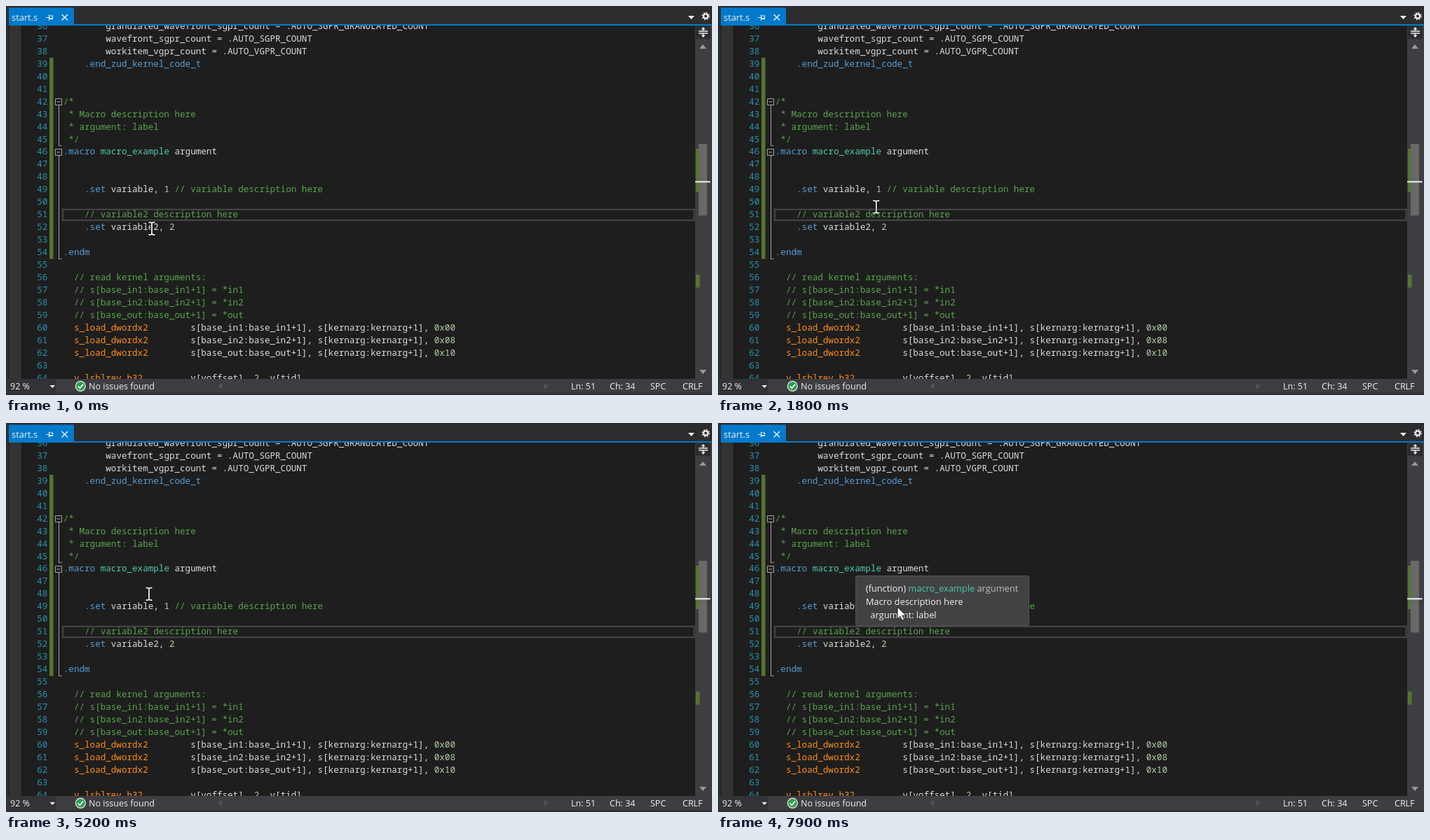
These frames come from a looping animation (1007 px wide and 556 px high, 8 s). An HTML page:

```html
<!DOCTYPE html>
<html lang="en">
<head>
<meta charset="utf-8">
<title>Editor hover hints</title>
<style>
html, body { margin: 0; width: 100%; height: 100%; overflow: hidden; background: #2d2d30; }
svg { display: block; }
text { white-space: pre; }
.code { font: 12.6px "Noto Sans Mono", "DejaVu Sans Mono", monospace; }
.ui { font: 12.85px "Open Sans", "Noto Sans", sans-serif; fill: #f1f1f1; }
.status { font-size: 12.5px; }
</style>
</head>
<body>
<svg id="stage" width="1007" height="556" viewBox="0 0 1007 556">
  <defs><clipPath id="view"><rect x="0" y="28" width="983" height="505"/></clipPath></defs>

  <!-- tab strip -->
  <rect width="1007" height="556" fill="#2d2d30"/>
  <path d="M4 2.5H97V26H1007V28H4Z" fill="#007acc"/>
  <text class="ui" x="8" y="20.5">start.s</text>
  <g fill="none" stroke="#d8eaf6" stroke-width="1.2">
    <path d="M57 16.5H61M61.5 12.5V20.5M61.5 14H66.5V18.5H61.5M61.5 17.6H66.5"/>
    <path d="M79.5 12L88 20.5M88 12L79.5 20.5" stroke-width="1.7"/>
  </g>
  <path d="M973 14H982L977.5 19Z" fill="#f1f1f1"/>
  <circle cx="998" cy="14.5" r="3" fill="none" stroke="#f1f1f1" stroke-width="2"/>
  <circle cx="998" cy="14.5" r="4.7" fill="none" stroke="#f1f1f1" stroke-width="2" stroke-dasharray="1.85 1.84"/>

  <!-- editor -->
  <rect x="4" y="28" width="979" height="505" fill="#1e1e1e"/>
  <rect x="5" y="28" width="16.5" height="505" fill="#333333"/>
  <rect x="62" y="74" width="5.5" height="287.5" fill="#577430"/>
  <rect x="81" y="290.8" width="900.5" height="15.4" fill="none" stroke="#464646" stroke-width="2"/>
  <g fill="none" stroke="#a5a5a5">
    <path d="M75.5 142V199.5H79.5M75.5 214V361.5H79.5"/>
    <path id="fold" d="M71 132.5H79.5V141.5H70.5V132.5ZM72.5 137H77.5"/>
    <use href="#fold" y="72"/>
  </g>
  <g id="code" class="code" clip-path="url(#view)"></g>

  <!-- vertical scroll bar -->
  <rect x="983" y="28" width="24" height="505" fill="#3e3e42"/>
  <rect x="984" y="28" width="21" height="19" fill="#2d2d30"/>
  <path d="M988 36H1001M988 39H1001M994.5 31V36M994.5 39V44" stroke="#f1f1f1" stroke-width="1.3"/>
  <path d="M991.5 33.5L994.5 30L997.5 33.5ZM991.5 41.5L994.5 45L997.5 41.5Z" fill="#f1f1f1"/>
  <path d="M989 61L994 55L999 61ZM989 520L994 526L999 520Z" fill="#999999"/>
  <rect x="988" y="197" width="12" height="102.5" fill="#686868"/>
  <path d="M984 204H988.5V266H984ZM984 384H989.5V402.5H984Z" fill="#577430"/>
  <rect x="983" y="250.3" width="21.5" height="2" fill="#f1f1f1"/>

  <!-- bottom bar -->
  <rect y="533" width="1007" height="20.5" fill="#3e3e42"/>
  <rect y="533" width="72" height="20.5" fill="#333337"/>
  <path d="M62.5 542H70L66.2 546Z" fill="#f1f1f1"/>
  <path d="M308 539V548L303 543.5ZM768 539V548L773 543.5Z" fill="#555558"/>
  <circle cx="106.3" cy="543.3" r="7" fill="#2f9e4f" stroke="#f1f1f1" stroke-width="1.2"/>
  <path d="M102.7 543.5L105.3 546.2L110 540.6" fill="none" stroke="#fff" stroke-width="1.7"/>
  <g id="status"></g>

  <g id="tips"></g>
  <g id="beam" fill="none">
    <path d="M-4.5 -9H-1.5L0 -8L1.5 -9H4.5M0 -8V7.5M-4.5 8.5H-1.5L0 7.5L1.5 8.5H4.5" stroke="#000" stroke-width="3"/>
    <path d="M-4.5 -9H-1.5L0 -8L1.5 -9H4.5M0 -8V7.5M-4.5 8.5H-1.5L0 7.5L1.5 8.5H4.5" stroke="#fff" stroke-width="1.7"/>
  </g>
  <path id="arrow" d="M0 0V17L4 13.3L6.7 19.3L9.5 18.1L6.9 12.2H12.2Z" fill="#fff" stroke="#111" stroke-width=".9"/>
</svg>
<script>
const $ = id => document.getElementById(id);
const CHAR = 7.56, LEFT = 81.8, ROW = 17.95;
const COLORS = { t: '#dcdcdc', c: '#57a64a', k: '#569cd6', m: '#4ec9b0', o: '#ff8c1a', n: '#b5cea8', l: '#2b91af', g: '#bdbdbd', w: '#f1f1f1' };

function make(parent, tag, attrs, text = '') {
  const el = document.createElementNS('http://www.w3.org/2000/svg', tag);
  for (const key in attrs) el.setAttribute(key, attrs[key]);
  el.textContent = text;
  parent.append(el);
  return el;
}

// line number: column, then pairs of colour key and text
const LOAD = (reg, off) => [2, 'o', 's_load_dwordx2        ', 't', `s[${reg}:${reg}+1], s[kernarg:kernarg+1], `, 'n', off];
const LINES = {
  36: [8, 't', 'granulated_wavefront_sgpr_count = .AUTO_SGPR_GRANULATED_COUNT'],
  37: [8, 't', 'wavefront_sgpr_count = .AUTO_SGPR_COUNT'],
  38: [8, 't', 'workitem_vgpr_count = .AUTO_VGPR_COUNT'],
  39: [4, 'k', '.end_zud_kernel_code_t'],
  42: [0, 'c', '/*'],
  43: [1, 'c', '* Macro description here'],
  44: [1, 'c', '* argument: label'],
  45: [1, 'c', '*/'],
  46: [0, 'k', '.macro ', 'm', 'macro_example ', 't', 'argument'],
  49: [4, 'k', '.set ', 't', 'variable, ', 'n', '1 ', 'c', '// variable description here'],
  51: [4, 'c', '// variable2 description here'],
  52: [4, 'k', '.set ', 't', 'variable2, ', 'n', '2'],
  54: [0, 'k', '.endm'],
  56: [2, 'c', '// read kernel arguments:'],
  57: [2, 'c', '// s[base_in1:base_in1+1] = *in1'],
  58: [2, 'c', '// s[base_in2:base_in2+1] = *in2'],
  59: [2, 'c', '// s[base_out:base_out+1] = *out'],
  60: LOAD('base_in1', '0x00'),
  61: LOAD('base_in2', '0x08'),
  62: LOAD('base_out', '0x10'),
  64: [2, 'o', 'v_lshlrev_b32         ', 't', 'v[voffset], ', 'n', '2', 't', ', v[tid]']
};

function runs(parent, x, y, parts) {
  const line = make(parent, 'text', { x, y });
  for (let i = 0; i < parts.length; i += 2) {
    make(line, 'tspan', { fill: COLORS[parts[i]] }, parts[i + 1]);
  }
}

for (let n = 36; n <= 64; n++) {
  const y = 302.2 + (n - 51) * ROW;
  runs($('code'), 44.2, y, ['l', String(n)]);
  if (LINES[n]) {
    const [col, ...parts] = LINES[n];
    runs($('code'), LEFT + col * CHAR, y, parts);
  }
}

for (const [x, text] of [[6, '92 %'], [118, 'No issues found'], [806, 'Ln: 51'], [861, 'Ch: 34'], [919, 'SPC'], [965, 'CRLF']]) {
  make($('status'), 'text', { class: 'ui status', x, y: 548.3 }, text);
}

const TIPS = [
  { from: 400, to: 1700, box: [193, 325.5, 198, 53],
    rows: [['w', '(local variable) variable2 = 2'], ['w', 'variable2 description here']] },
  { from: 2700, to: 5100, box: [197, 272.5, 190, 52.5],
    rows: [['w', '(local variable) variable = 1'], ['w', 'variable description here']] },
  { from: 6000, to: 8000, box: [196, 218, 248, 72],
    rows: [['w', '(function) ', 'm', 'macro_example', 'g', ' argument'], ['w', 'Macro description here'], ['w', '  argument: label']] }
];
for (const tip of TIPS) {
  const [x, y, width, height] = tip.box;
  tip.el = make($('tips'), 'g', { class: 'ui' });
  make(tip.el, 'rect', { x: x + .5, y: y + .5, width: width - 1, height: height - 1, rx: 2, fill: '#424245', stroke: '#545458' });
  tip.rows.forEach((row, i) => runs(tip.el, x + 14.7, y + 23.2 + i * 19, row));
}

// pointer path: time, x, y
const PATH = [
  [0, 208, 318.3], [200, 195.7, 316.8], [1600, 195.7, 316.8], [1700, 211, 302],
  [1800, 225.7, 287.3], [1900, 228, 282], [2100, 225, 279.3], [2200, 225, 279.3],
  [2400, 208, 270], [2600, 198.2, 264.7], [4800, 198.2, 264.7], [4900, 202.8, 261.3],
  [5100, 205, 252], [5400, 202, 230], [5700, 198.5, 215], [5900, 198, 212.2],
  [7500, 198, 212.2], [7600, 206, 222], [7900, 256, 263], [8000, 256, 263]
];

function pointer(t) {
  const i = PATH.findIndex(p => p[0] > t);
  const [t0, x0, y0] = PATH[i - 1], [t1, x1, y1] = PATH[i];
  const k = (t - t0) / (t1 - t0);
  return [x0 + (x1 - x0) * k, y0 + (y1 - y0) * k];
}

const show = (el, on) => { el.style.display = on ? '' : 'none'; };
const start = performance.now();

function draw() {
  const now = Math.max(0, performance.now() - start) % 8000;
  const t = Math.floor(now / 100) * 100;
  for (const tip of TIPS) show(tip.el, t >= tip.from && t < tip.to);
  const [x, y] = pointer(t);
  const overTip = t >= 7600;
  show($('beam'), !overTip);
  show($('arrow'), overTip);
  $(overTip ? 'arrow' : 'beam').setAttribute('transform', `translate(${x} ${y})`);
  requestAnimationFrame(draw);
}
draw();
</script>
</body>
</html>
```
